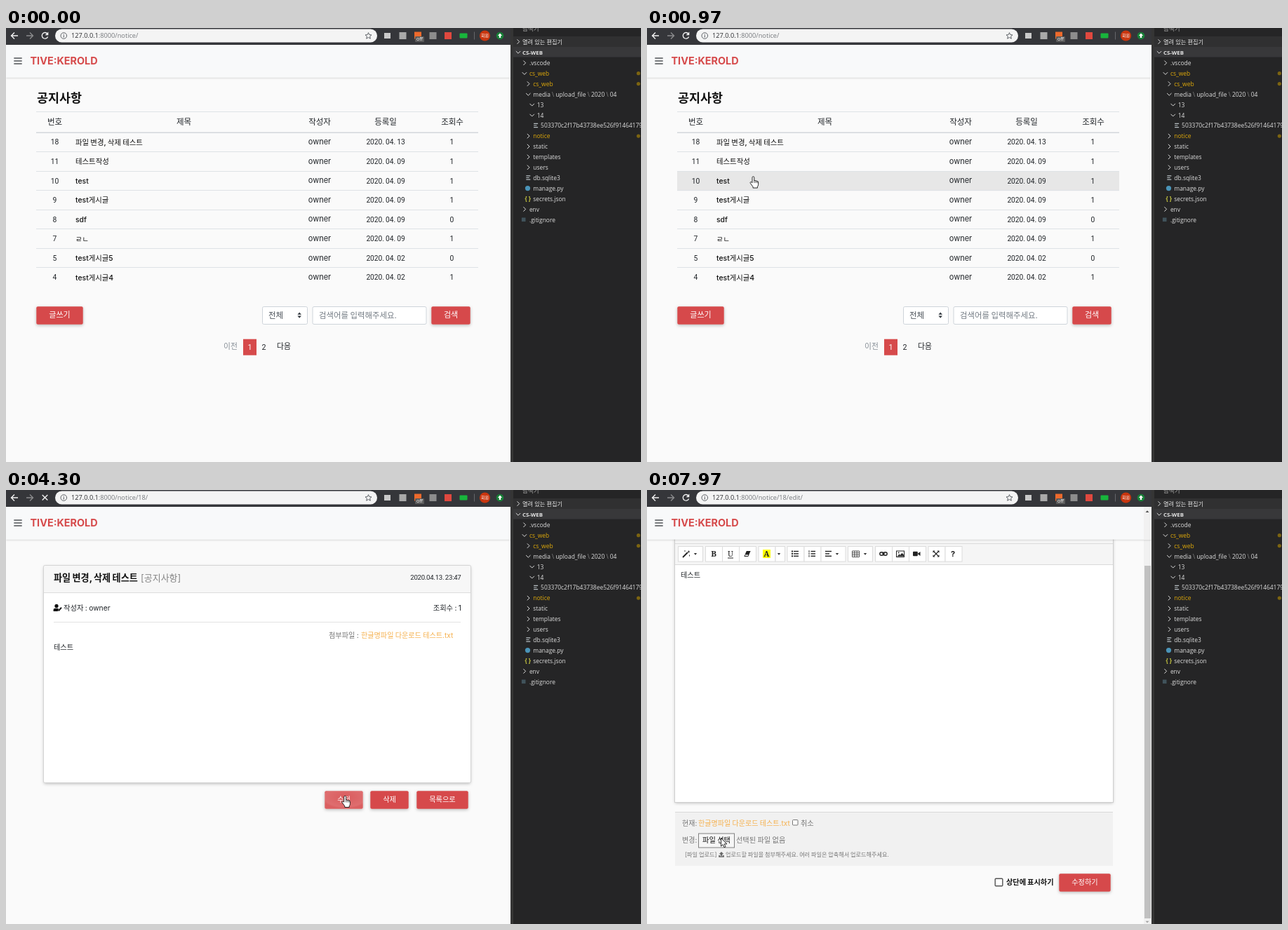
An HTML page for the animation above (8000 ms loop, 905x619 px).

```html
<!DOCTYPE html>
<html lang="ko">
<head>
<meta charset="utf-8">
<title>공지사항</title>
<style>
html, body { margin: 0; width: 100%; height: 100%; overflow: hidden; background: #fafafa; }
svg { display: block; width: 905px; height: 619px; }
text { font-family: Inter, 'Noto Sans CJK KR', 'Noto Sans CJK', sans-serif; white-space: pre; word-spacing: -.05em; }
.num { font-family: Roboto, 'Noto Sans CJK KR', sans-serif; }
.ui { font-family: 'Open Sans', 'Noto Sans CJK KR', sans-serif; word-spacing: 0; }
.serif { font-family: 'Noto Serif', serif; }
</style>
</head>
<body>
<svg id="stage" viewBox="0 0 905 619" xmlns="http://www.w3.org/2000/svg"></svg>
<script>
const RED = '#d64a4b', INK = '#212529', LOOP = 8000;
const stage = document.getElementById('stage');

const rect = (x, y, w, h, fill, more = '') =>
  `<rect x="${x}" y="${y}" width="${w}" height="${h}" fill="${fill}" ${more}/>`;
const line = (d, stroke, w = 1, more = '') =>
  `<path d="${d}" fill="none" stroke="${stroke}" stroke-width="${w}" ${more}/>`;
const shape = (d, fill, more = '') => `<path d="${d}" fill="${fill}" ${more}/>`;
const dot = (x, y, r, fill, more = '') => `<circle cx="${x}" cy="${y}" r="${r}" fill="${fill}" ${more}/>`;
const text = (x, y, size, s, fill = INK, more = '') =>
  `<text x="${x}" y="${y}" font-size="${size}" fill="${fill}" ${more}>${s}</text>`;
const group = (id, body, more = '') => `<g id="${id}" ${more}>${body}</g>`;

const MID = 'text-anchor="middle"', END = 'text-anchor="end"';
const MED = 'font-weight="500"', BOLD = 'font-weight="700"';
const NUM = 'class="num"', UI = 'class="ui"';
const SHADOW = 'filter="url(#drop)"', FAINT = 'filter="url(#faint)"';

const button = (x, y, w, label, size = 10.2) =>
  rect(x + .3, y + .2, w - .6, 25.6, RED, `rx="2" ${SHADOW}`) + text(x + w / 2, y + 16, size, label, '#fff', MID + MED);
const caret = (x, y) => shape(`M${x - 2.2} ${y - 1}h4.4l-2.2 2.7z`, '#333');

function toolbar() {
  let s = rect(0, 0, 719, 24, '#35363a');
  s += line('M17 11H8M12 6.5L7.5 11L12 15.5', '#f1f1f1', 1.4);
  s += line('M29 11h9M34 6.5L38.5 11L34 15.5', '#8a8b8d', 1.4);
  s += group('reload', line('M59 8.2A4.3 4.3 0 1 0 59.6 12.4', '#f1f1f1', 1.4) + shape('M60.3 5.6v4.6h-4.6z', '#f1f1f1'));
  s += group('stop', line('M51.7 7l7.6 7.6M59.3 7l-7.6 7.6', '#f1f1f1', 1.4));
  s += rect(70, 1.5, 459, 19, '#f4f4f4', 'rx="9.5"');
  s += dot(82.3, 11, 4.3, 'none', 'stroke="#5f6368"') + line('M82.3 10.2v3.2M82.3 8.4v1.1', '#5f6368', 1.1);
  s += `<text x="93" y="14.4" font-size="9.2" fill="#2b2c2f" ${UI}>127.0.0.1<tspan fill="#75787c">:8000<tspan id="path"></tspan></tspan></text>`;
  s += line('M516.5 6.6l1.3 3 3.2.3-2.4 2.1.7 3.2-2.8-1.7-2.8 1.7.7-3.2-2.4-2.1 3.2-.3z', '#5f6368', 1);
  s += rect(539, 7, 9, 8, '#c9c9c9') + rect(560.5, 6, 10, 10, '#a9a9a9');
  s += rect(582, 5.5, 10, 10, '#ee6a2c') + rect(583, 12, 13, 8, '#5b5b5b', 'rx="1"');
  s += text(589.5, 18.3, 7, 'off', '#fff', MID + UI);
  s += rect(603.5, 6, 10, 10, '#8d8d8d') + rect(625, 6, 10, 10, '#e0483f') + rect(646.5, 7.5, 11, 7, '#18b53c', 'rx="1"');
  s += line('M667.5 5.5v11', '#66676b');
  s += dot(682.5, 11, 7.6, '#c9360f') + text(682.5, 13.2, 6, '회원', '#fff', MID);
  s += dot(704, 11, 5.3, '#188038') + shape('M704 7.6l3.1 3.5h-1.9v3h-2.4v-3h-1.9z', '#fff');
  return s;
}

function navbar() {
  const bars = [43, 47, 51].map(y => line(`M11.3 ${y}h11.4`, '#63666a', 1.7)).join('');
  return rect(0, 24, 719, 46.5, '#f8f9fa', FAINT) + bars + text(34.5, 52.1, 14.4, 'TIVE:KEROLD', RED, BOLD);
}

const posts = [
  [18, '파일 변경, 삭제 테스트', '04. 13', 1], [11, '테스트작성', '04. 09', 1],
  [10, 'test', '04. 09', 1], [9, 'test게시글', '04. 09', 1], [8, 'sdf', '04. 09', 0],
  [7, 'ㄹㄴ', '04. 09', 1], [5, 'test게시글5', '04. 02', 0], [4, 'test게시글4', '04. 02', 1]
];
const ROW = 27.57, TOP = 149.5;

function listPage() {
  let s = rect(43, TOP, 630, ROW, '#e7e7e7', 'id="hover"');
  s += text(44, 106.3, 17.4, '공지사항', '#111', BOLD);
  s += line('M43 119.5h630', '#dee2e6') + line('M43 149.2h630', '#d3d7db', 1.5);
  const heads = [[69.5, '번호'], [253.5, '제목'], [447, '작성자'], [541, '등록일'], [636, '조회수']];
  for (const [x, h] of heads) s += text(x, 138, 11.5, h, INK, MID + MED);
  posts.forEach(([no, title, date, views], i) => {
    const y = 166.7 + i * ROW;
    if (i) s += line(`M43 ${Math.round(TOP + i * ROW) - .5}h630`, '#dee2e6');
    s += text(69.5, y - .3, 10.3, no, INK, MID + NUM) + text(99, y, 10.4, title, '#111', MED);
    s += text(447, y - .6, 11, 'owner', INK, MID) + text(541, y - .3, 10.2, '2020. ' + date, INK, MID + NUM);
    s += text(635.5, y - .3, 10.3, views, INK, MID + NUM);
  });
  s += button(43, 397, 67, '글쓰기', 11);
  s += rect(365.5, 397.5, 64, 25, '#fff', 'rx="2" stroke="#ced4da"') + text(374, 413.6, 11.5, '전체', '#495057');
  s += shape('M415.4 408.8h5.6l-2.8-3.2zM415.4 410.6h5.6l-2.8 3.2z', '#343a40');
  s += rect(437, 397.5, 162, 25, '#fff', 'rx="2" stroke="#ced4da"');
  s += text(446, 413.6, 11.4, '검색어를 입력해주세요.', '#747c84') + button(606, 397, 56, '검색', 11);
  s += text(320, 458.2, 10.8, '이전', '#868e96', MID) + rect(338, 443.7, 19, 23, RED);
  s += text(347.5, 458.6, 10.8, '1', '#fff', MID + NUM) + text(367.5, 458.6, 10.8, '2', INK, MID + NUM);
  return s + text(396, 458.2, 10.8, '다음', INK, MID);
}

function detailPage() {
  let s = rect(54, 108, 608, 309.5, '#fff', `rx="2" ${SHADOW}`);
  s += rect(54, 108, 608, 38, '#f7f7f7') + line('M54 146.5h608', '#dcdcdc');
  s += rect(53.5, 107.5, 609, 310, 'none', 'rx="2" stroke="#d4d4d4"');
  s += text(68, 130.3, 13.1, '파일 변경, 삭제 테스트', '#111', BOLD) + text(192, 130.3, 13, '[공지사항]', '#868686');
  s += text(648.5, 127.7, 9.6, '2020.04.13. 23:47', INK, END + NUM + 'letter-spacing="-.25"');
  s += dot(72, 165.4, 2.6, '#111') + shape('M67.6 173v-1.8q0-2.4 2.6-2.4h3l2 .6-1.4 3.6z', '#111');
  s += line('M74.8 172.3l4.2-4.6', '#111', 2);
  s += text(82, 171.6, 10.3, '작성자 : owner') + text(649, 171.6, 10.3, '조회수 : 1', INK, END);
  s += line('M68 188.5h580', '#e2e2e2');
  s += text(460, 210.9, 10.2, '첨부파일 :', '#777', MED);
  s += text(506, 210.9, 10.1, '한글명파일 다운로드 테스트.txt', '#f5b04d');
  s += text(68, 227.8, 10.2, '테스트');
  s += button(454, 429, 55, '수정');
  s += rect(454, 429, 55, 26, 'url(#ripple)', 'id="press" rx="2"');
  return s + button(519, 429, 55, '삭제') + button(585, 429, 74, '목록으로');
}

const bars = (x, ws) => ws.map((w, i) => line(`M${x} ${87.5 + i * 3.4}h${w}`, '#222', 1.4)).join('');

function editorTools() {
  const sets = [[44, 35], [83, 24, 24, 24], [158.5, 24, 13.5], [199.5, 24, 24, 35], [286, 35], [325, 24, 24, 24], [400.5, 24, 24]];
  let s = '';
  for (const [x, ...ws] of sets) {
    let at = x;
    for (const w of ws) {
      s += rect(at + .5, 80.5, w, 21.5, '#fff', 'stroke="#dcdcdc"');
      at += w;
    }
  }
  s += line('M51 96l7-7', '#222', 1.8) + line('M59.5 86.5v3M58 88h3M54 86v2M60.5 92.5v2', '#222', .9);
  s += text(95, 95, 11.5, 'B', '#222', MID + BOLD + ' class="serif"');
  s += text(119, 94.5, 11, 'U', '#222', MID + MED + ' class="serif"') + line('M115 97h8', '#222');
  s += shape('M141.8 87h5.8l-3.4 8h-5.8z', '#222') + line('M140 93.2h4', '#fff', 1.6);
  s += rect(165, 85, 11, 12, '#ffff00') + text(170.5, 95, 11, 'A', '#222', MID + BOLD + ' class="serif"');
  for (const x of [69, 188, 271, 311]) s += caret(x, 91);
  s += bars(209, [7, 7, 7]) + bars(233.5, [6.5, 6.5, 6.5]) + bars(254, [9, 6, 9]);
  for (const y of [87.5, 90.9, 94.3]) s += rect(206, y - 1, 2, 2, '#222') + line(`M231 ${y - 1.3}v2.6`, '#222');
  s += line('M292.5 87h10v8.5h-10zM292.5 89.8h10M292.5 92.6h10M295.8 87v8.5M299.2 87v8.5', '#444', .9);
  s += rect(331.8, 88.7, 5.2, 4.6, 'none', 'rx="2.3" stroke="#222" stroke-width="1.4"');
  s += rect(337, 88.7, 5.2, 4.6, 'none', 'rx="2.3" stroke="#222" stroke-width="1.4"') + line('M335 91h4', '#222', 1.2);
  s += rect(355.5, 87, 11, 8.5, 'none', 'stroke="#222"') + shape('M356.5 94.5l3-3 1.5 1.3 2.5-3 2.5 3v1.7z', '#222') + dot(358.7, 89.4, .9, '#222');
  s += rect(379, 87.7, 6.8, 6.6, '#222', 'rx="1"') + shape('M385.5 91l4-3v6z', '#222');
  s += line('M408.5 87.5l7 7M415.5 87.5l-7 7', '#222', 1.1);
  s += shape('M407.5 86.5h3l-3 3zM416.5 86.5v3l-3-3zM407.5 95.5v-3l3 3zM416.5 95.5h-3l3-3z', '#222');
  return s + text(436, 95, 11, '?', '#222', MID + BOLD);
}

function editPage() {
  let s = rect(40, 60, 624, 385, '#fff', SHADOW) + rect(40, 60, 624, 46, '#f5f5f5');
  s += line('M40 76.5h624M40 106.5h624', '#dadada') + rect(39.5, 60, 625, 385.5, 'none', 'stroke="#cfcfcf"');
  s += editorTools() + text(48, 125.4, 10.2, '테스트');
  s += rect(40, 459, 624, 77, '#f1f1f1') + line('M40 459.5h624', '#d9d9d9');
  s += text(50, 478.7, 10, '현재:', '#777') + text(73, 478.7, 10.05, '한글명파일 다운로드 테스트.txt', '#f5b04d');
  s += rect(207.5, 470.5, 7.5, 7.5, '#fff', 'rx="1" stroke="#767676"') + text(219, 478.7, 10.2, '취소', '#777');
  s += text(50, 503, 10, '변경:', '#777') + rect(73.5, 490, 51, 20, '#f6f6f6', 'stroke="#808080"');
  s += text(99, 503.2, 10.2, '파일 선택', '#111', MID) + text(127, 503.2, 10.2, '선택된 파일 없음', '#777');
  s += text(54, 522.6, 8.2, '[파일 업로드]', '#777');
  s += shape('M106 516l3.3 3.3h-2v2.4h-2.6v-2.4h-2zM102.2 521h1.8v1.3h4V521h1.8v2.8h-7.6z', '#666');
  s += text(112, 522.6, 8.15, '업로드할 파일을 첨부해주세요. 여러 파일은 압축해서 업로드해주세요.', '#777');
  s += rect(496.2, 554.2, 10.6, 10.6, '#fff', 'rx="1" stroke="#555" stroke-width="1.4"');
  s += text(512, 562.7, 10.2, '상단에 표시하기', '#111', BOLD) + button(587, 547, 74, '수정하기');
  s += rect(708, 24, 11, 595, '#f1f1f1') + rect(709, 108, 9, 503, '#c1c1c1');
  return s + shape('M710.5 614.8h5l-2.5 2.8z', '#a3a3a3');
}

const AMBER = '#dfa90a', PALE = '#dcdcdc';
// marker, indent, label, colour
const tree = [
  ['>', 1, '.vscode'], ['v', 1, 'cs_web', AMBER], ['>', 2, 'cs_web', AMBER],
  ['v', 2, 'media<tspan fill="#888"> \\ </tspan>upload_file<tspan fill="#888"> \\ </tspan>2020<tspan fill="#888"> \\ </tspan>04'],
  ['v', 3, '13'], ['v', 3, '14'], ['=', 4, '503370c2f17b43738ee526f91464179'],
  ['>', 2, 'notice', AMBER], ['>', 2, 'static'], ['>', 2, 'templates'], ['>', 2, 'users'],
  ['=', 2, 'db.sqlite3'], ['o', 2, 'manage.py'], ['{', 2, 'secrets.json'], ['>', 1, 'env'], ['#', 1, '.gitignore']
];

function marker(kind, x, y) {
  if (kind === '>') return line(`M${x - 1.5} ${y - 3.2}l3.2 3.2-3.2 3.2`, PALE, 1);
  if (kind === 'v') return line(`M${x - 3.2} ${y - 1.5}l3.2 3.2 3.2-3.2`, PALE, 1);
  if (kind === '=') return line(`M${x - 3} ${y - 2.8}h6M${x - 3} ${y - .2}h4.4M${x - 3} ${y + 2.4}h6`, '#b8c0c4', 1.1);
  if (kind === 'o') return dot(x - .8, y, 3.6, '#4a94b8');
  if (kind === '{') return text(x - .5, y + 2.8, 8, '{ }', '#cbcb41', MID + BOLD + UI);
  return rect(x - 4, y - 2.8, 5.6, 5.6, '#41535b');
}

function sidebar() {
  let s = rect(719, 0, 186, 619, '#252526') + rect(719, 0, 4, 619, '#353535');
  s += text(736, 4, 8.5, '탐색기', '#a8a8a8', UI);
  s += rect(723, 12, 182, 14.5, '#303031') + rect(723, 26.5, 182, 15, '#38383a');
  s += marker('>', 730, 19.5) + text(736, 22.7, 8.2, '열려 있는 편집기', '#e6e6e6', UI + MED);
  s += marker('v', 730, 34.5) + text(736, 37.5, 7.8, 'CS-WEB', '#e6e6e6', UI + BOLD);
  tree.forEach(([kind, depth, label, fill = PALE], i) => {
    const y = 49.8 + i * 14.9, x = 740.5 + depth * 5.4;
    s += marker(kind, x - 7, y) + text(x, y + 3.2, 8.45, label, fill, UI);
    if (fill === AMBER) s += dot(901.3, y, 2.6, '#7c6410');
  });
  return s;
}

const OUTLINE = 'stroke="#111" stroke-width=".9" stroke-linejoin="round"';
const pointers = [
  shape('M0 0v11.6l2.7-2.5 1.8 4.2 2-.9-1.8-4h3.7z', '#fff', OUTLINE),
  shape('M-1.4 1.2a1.4 1.4 0 0 1 2.8 0v4.6q1.2-.9 2.2.3 1.2-.6 2 .5 1.6-.2 1.6 1.4v3.2q0 1.8-1.2 3v1.8h-6.4v-1.6l-3.6-5q-.8-1.4.3-1.9 1.1-.3 2.3 1.2z', '#fff', OUTLINE)
    + line('M1.4 6v3M3.6 6.3v2.7M5.6 6.8v2.3', '#111', .7),
  line('M-2.5-5.2h1.7l.8.7.8-.7h1.7M-2.5 5.2h1.7l.8-.7.8.7h1.7M0-4.6v9.2', '#222', 1)
];

stage.innerHTML = `<defs>
<filter id="drop" x="-10%" y="-20%" width="120%" height="160%"><feDropShadow dx="0" dy="1.4" stdDeviation="2" flood-color="#000" flood-opacity=".27"/></filter>
<filter id="faint" x="-2%" y="-10%" width="104%" height="130%"><feDropShadow dx="0" dy="1" stdDeviation="1.2" flood-color="#000" flood-opacity=".16"/></filter>
<radialGradient id="ripple" cx=".53" cy=".35" r=".62"><stop offset="0" stop-color="#fff" stop-opacity=".1"/><stop offset=".85" stop-color="#fff" stop-opacity=".2"/><stop offset="1" stop-color="#fff" stop-opacity=".12"/></radialGradient>
</defs>` + rect(0, 0, 905, 619, '#fafafa')
  + group('list', listPage()) + group('detail', detailPage()) + group('edit', editPage())
  + navbar() + group('rail', rect(708, 24, 11, 47, '#f1f1f1') + shape('M710.5 32h5l-2.5-2.8z', '#505050'))
  + toolbar() + sidebar()
  + group('cursor', pointers.map((p, i) => group('p' + i, p)).join(''));

const $ = Object.fromEntries([...stage.querySelectorAll('[id]')].map(e => [e.id, e]));
const show = (id, on) => $[id].setAttribute('visibility', on ? 'inherit' : 'hidden');

const ARROW = 0, HAND = 1, BEAM = 2;
// time, x, y, pointer, glides on to the next key
const track = [
  [500, 790, 415, ARROW, 1], [770, 150, 232, HAND], [840, 150, 232, HAND, 1], [1300, 155, 162, HAND],
  [3840, 486, 433.5, HAND], [3970, 486, 433.5, HAND, 1], [4100, 483.2, 436.5, HAND],
  [7100, 403.8, 438.3, BEAM], [7300, 284.5, 524.5, BEAM], [7440, 250.5, 525, ARROW],
  [7640, 185, 512, ARROW], [7700, 125.5, 500, ARROW], [7840, 114, 498, ARROW], [7970, 105.5, 496.5, ARROW]
];

function cursorAt(t) {
  const i = track.findLastIndex(k => k[0] <= t);
  if (i < 0) return null;
  const [t0, x, y, kind, glide] = track[i];
  if (!glide) return { x, y, kind };
  const [t1, x1, y1] = track[i + 1], p = (t - t0) / (t1 - t0);
  return { x: x + (x1 - x) * p, y: y + (y1 - y) * p, kind };
}

function draw(t) {
  const page = t < 3840 ? 'list' : t < 7100 ? 'detail' : 'edit';
  for (const id of ['list', 'detail', 'edit']) $[id].setAttribute('display', id === page ? 'inline' : 'none');
  show('rail', page === 'edit');
  $.path.textContent = { list: '/notice/', detail: '/notice/18/', edit: '/notice/18/edit/' }[page];

  const busy = t >= 4300 && t < 7100;
  show('stop', busy);
  show('reload', !busy);
  show('press', busy);

  const c = cursorAt(t);
  show('cursor', c);
  pointers.forEach((_, i) => show('p' + i, c && c.kind === i));
  if (c) $.cursor.setAttribute('transform', `translate(${c.x.toFixed(2)} ${c.y.toFixed(2)})`);

  const row = c && t >= 840 ? Math.max(0, Math.floor((c.y - TOP) / ROW)) : -1;
  show('hover', page === 'list' && row >= 0);
  $.hover.setAttribute('y', TOP + Math.max(0, row) * ROW);
}

const start = performance.now();
function tick() {
  draw((performance.now() - start) % LOOP);
  requestAnimationFrame(tick);
}
tick();
</script>
</body>
</html>
```
